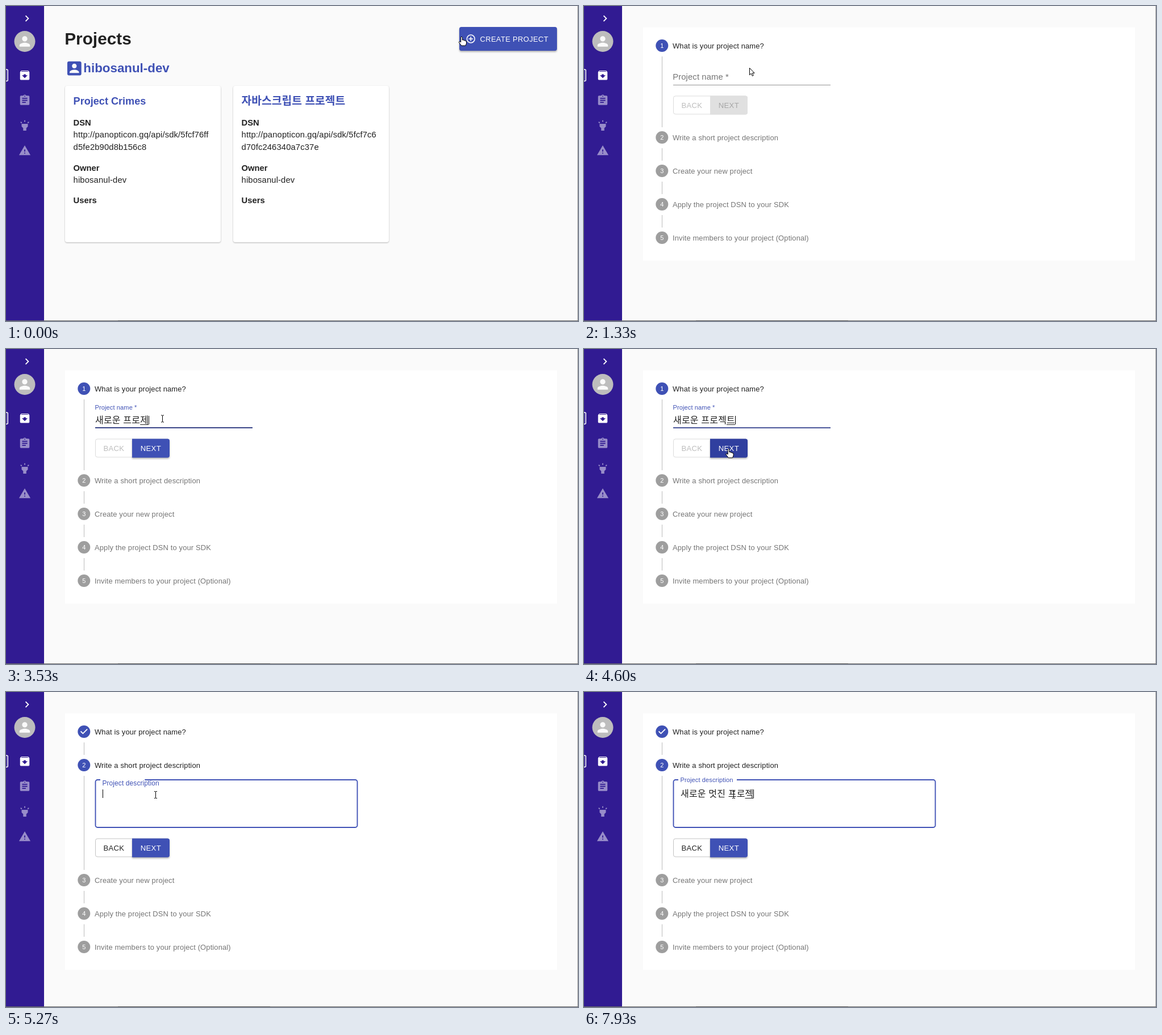
An HTML page for the animation above (8000 ms loop, 1007 by 556 pixels).

```html
<!DOCTYPE html>
<html lang="ko">
<head>
<meta charset="utf-8">
<title>Create project</title>
<style>
html, body { margin: 0; width: 100%; height: 100%; overflow: hidden; background: #fafafa; }
svg { display: block; }
text { font-family: "Liberation Sans", Arial, "Noto Sans CJK KR", "Noto Sans CJK", sans-serif; white-space: pre; }
.card { fill: #fff; filter: drop-shadow(0 1px 1px rgba(0,0,0,.28)); }
.raised { filter: drop-shadow(0 2px 1.5px rgba(0,0,0,.3)); }
.body { font-size: 14.77px; letter-spacing: .1385px; }
.btn { font-size: 13.1px; letter-spacing: .3px; text-anchor: middle; }
.typed { font-size: 16px; letter-spacing: .18px; fill: #212121; }
.step { font-size: 12.93px; letter-spacing: .1385px; }
</style>
</head>
<body>
<svg id="stage" width="1007" height="556" viewBox="0 0 1007 556"></svg>
<script>
const BLUE = '#3f51b5', DARK_BLUE = '#303f9f', INK = '#212121', GREY = '#757575';
const LOOP = 8000, OPEN = 1000, NAME_FOCUS = 1800, NEXT_CLICK = 4784, DESC_FOCUS = 5190;

const icons = {
  chevron: 'M10 6 8.59 7.41 13.17 12l-4.58 4.59L10 18l6-6z',
  person: 'M12 12c2.21 0 4-1.79 4-4s-1.79-4-4-4-4 1.79-4 4 1.79 4 4 4zm0 2c-2.67 0-8 1.34-8 4v2h16v-2c0-2.66-5.33-4-8-4z',
  archive: 'M20.54 5.23l-1.39-1.68C18.88 3.21 18.47 3 18 3H6c-.47 0-.88.21-1.16.55L3.46 5.23C3.17 5.57 3 6.02 3 6.5V19c0 1.1.9 2 2 2h14c1.1 0 2-.9 2-2V6.5c0-.48-.17-.93-.46-1.27zM12 17.5 6.5 12H10v-2h4v2h3.5zM5.12 5l.81-1h12l.94 1z',
  tasks: 'M19 3h-4.18C14.4 1.84 13.3 1 12 1s-2.4.84-2.82 2H5c-1.1 0-2 .9-2 2v14c0 1.1.9 2 2 2h14c1.1 0 2-.9 2-2V5c0-1.1-.9-2-2-2zm-7 0c.55 0 1 .45 1 1s-.45 1-1 1-1-.45-1-1 .45-1 1-1zm2 14H7v-2h7zm3-4H7v-2h10zm0-4H7V7h10z',
  torch: 'M6 14l3 3v5h6v-5l3-3V9H6zM11 2h2v3h-2zM3.5 5.9 4.9 4.5 7 6.6 5.6 8zM17 6.6l2.1-2.1 1.4 1.4L18.4 8z',
  warning: 'M1 21h22L12 2zm12-3h-2v-2h2zm0-4h-2v-4h2z',
  account: 'M3 5v14c0 1.1.89 2 2 2h14c1.1 0 2-.9 2-2V5c0-1.1-.9-2-2-2H5c-1.11 0-2 .9-2 2zm12 4c0 1.66-1.34 3-3 3s-3-1.34-3-3 1.34-3 3-3 3 1.34 3 3zm-9 8c0-2 4-3.1 6-3.1s6 1.1 6 3.1v1H6z',
  check: 'M10 17 5 12l1.41-1.41L10 14.17l7.59-7.59L19 8z',
  plus: 'M13 7h-2v4H7v2h4v4h2v-4h4v-2h-4zM12 2a10 10 0 1 0 0 20 10 10 0 1 0 0-20zm0 18a8 8 0 1 1 0-16 8 8 0 1 1 0 16z'
};

const icon = (name, x, y, size, fill = '#fff', extra = '') =>
  `<path d="${icons[name]}" fill="${fill}" fill-rule="evenodd" ${extra} transform="translate(${x - size / 2} ${y - size / 2}) scale(${size / 24})"/>`;
const text = (x, y, str, attrs = '') => `<text x="${x}" y="${y}" ${attrs}>${str}</text>`;
const rect = (x, y, w, h, attrs = '') => `<rect x="${x}" y="${y}" width="${w}" height="${h}" ${attrs}/>`;
const bold = (x, y, str, size, fill = INK) => text(x, y, str, `font-size="${size}" font-weight="700" fill="${fill}"`);

function projectCard(x, title, titleSize, url) {
  const tx = x + 14.6, body = `class="body" fill="${INK}"`;
  return rect(x, 141, 274, 276, 'rx="3.7" class="card"') +
    bold(tx, 174, title, titleSize, BLUE) +
    bold(tx, 210.5, 'DSN', 14.77) +
    url.map((line, i) => text(tx, 232 + 22 * i, line, body)).join('') +
    bold(tx, 290.5, 'Owner', 14.77) + text(tx, 312, 'hibosanul-dev', body) +
    bold(tx, 348, 'Users', 14.77);
}

// Back / next pair; y is the top edge
const buttons = (id, y, backOn) =>
  rect(157.5, y + .5, 130, 32, `rx="3.5" fill="#fff" stroke="rgba(0,0,0,${backOn ? .23 : .14})"`) +
  `<path id="${id}" d="M222 ${y}h62.3a3.7 3.7 0 0 1 3.7 3.7v26a3.7 3.7 0 0 1-3.7 3.7H222z" fill="${BLUE}" class="raised"/>` +
  text(189.9, y + 21.2, 'BACK', `class="btn" fill="${backOn ? INK : '#bdbdbd'}"`) +
  text(254.9, y + 21.2, 'NEXT', `id="${id}Text" class="btn" fill="#fff"`);

const field = (id, x, y) =>
  text(x, y, '', `id="${id}" class="typed"`) +
  rect(x, y + 2, 0, 1, `id="${id}Mark" fill="${INK}"`) +
  rect(x, y - 13, 1, 15, `id="${id}Caret" fill="#000"`);

const nameForm =
  text(0, 0, 'Project name *', 'id="nameLabel" class="body"') + field('name', 157, 61) +
  rect(157, 69, 277, 1, 'id="nameLine" fill="#949494"') +
  rect(157, 68.2, 277, 1.8, `id="nameFocus" fill="#37458f"`) +
  buttons('next1', 88.4, false);
const descForm =
  rect(157.5, 26, 461, 84, 'id="box" rx="3.7" fill="none"') +
  rect(166, 24, 103, 4, 'id="notch" fill="#fff"') +
  text(0, 0, 'Project description', 'id="descLabel" class="body"') + field('desc', 170, 56) +
  buttons('next2', 129.4, true);

const labels = ['What is your project name?', 'Write a short project description', 'Create your new project',
  'Apply the project DSN to your SDK', 'Invite members to your project (Optional)'];
const forms = [nameForm, descForm, '', '', ''];

const stepper = labels.map((label, i) => `<g id="step${i}">
  <circle id="dot${i}" cx="137.3" r="11"/>
  ${text(137.3, 4, i + 1, `id="num${i}" font-size="11" fill="#fff" text-anchor="middle"`)}
  ${i ? '' : icon('check', 137.3, 0, 22, '#fff', 'id="tick"')}
  ${text(156, 4.5, label, `id="label${i}" class="step"`)}
  ${i < 4 ? rect(137, 19, 1, 22, `id="rail${i}" fill="#bdbdbd"`) : ''}
  <svg id="form${i}" y="19" width="1007" height="0"><g transform="translate(0 -19)">${forms[i]}</g></svg>
</g>`).join('');

const $ = id => document.getElementById(id);
$('stage').innerHTML =
  rect(0, 0, 1007, 556, 'fill="#fafafa"') +
  rect(0, 0, 67, 556, 'fill="#311b92"') +
  icon('chevron', 37, 22, 22) +
  '<circle cx="33" cy="62.5" r="18.5" fill="#bdbdbd"/>' + icon('person', 33, 62.5, 27.7, '#fafafa') +
  rect(-4, 112, 7.3, 20.5, 'rx="2" fill="#4a3a9e" stroke="#fff" stroke-width="1.4"') +
  icon('archive', 33, 122.3, 22) +
  ['tasks', 'torch', 'warning'].map((n, i) => icon(n, 33, 166.5 + 44.3 * i, 22, '#988dc9')).join('') +
  `<g id="list">${bold(103.2, 68, 'Projects', 29.8)}
    ${icon('account', 120.3, 110, 33, BLUE)}${bold(136.3, 117, 'hibosanul-dev', 22.35, BLUE)}
    ${rect(798, 37, 172, 42, 'id="create" rx="3.7" class="raised"')}
    ${icon('plus', 818.3, 58, 18.5)}
    ${text(834.5, 62.7, 'CREATE PROJECT', 'font-size="12.92" letter-spacing=".37" fill="#fff"')}
    ${projectCard(104, 'Project Crimes', 18.1, ['http://panopticon.gq/api/sdk/5fcf76ff', 'd5fe2b90d8b156c8'])}
    ${projectCard(400, '자바스크립트 프로젝트', 19.3, ['http://panopticon.gq/api/sdk/5fcf7c6', 'd70fc246340a7c37e'])}
  </g>
  <g id="wizard">${rect(104, 37.5, 866, 412, 'id="paper" fill="#fff"')}${stepper}</g>` +
  rect(1006, 0, 1, 556, 'fill="#a0a0a0"') + rect(0, 555, 1007, 1, 'fill="#666"') + rect(197, 555, 268, 1, 'fill="#444"') +
  `<g id="pointer" stroke="#000" stroke-width="1" stroke-linejoin="round" fill="#fff">
    <path id="hand" d="M-1.3 1.2Q0-1 1.3 1.2V6L3.8 5.8 4.4 7 6.6 6.8 7.2 8 8.6 8.3V12L7 16H-.2L-4.6 10.2Q-4.4 8-2.6 9L-1.3 10z"/>
    <path id="arrow" d="M0 0V12.2L2.8 9.6 4.8 14 6.8 13.1 4.9 8.8H8.6z"/>
    <path id="beam" fill="none" d="M-2.5-6H-.6L0-5.4.6-6H2.5M0-5.4V5.4M-2.5 6H-.6L0 5.4.6 6H2.5"/>
  </g>`;

const phrase = (prefix, states) => states.split('|').map(s => prefix + s);
const opening = phrase('', 'ㅅ|새|샐|새로|새롱|새로우|새로운|새로운 ');
const project = 'ㅍ|프|플|프로|프롲|프로제|프로젝|프로젝ㅌ|프로젝트';
const nameKeys = [...opening, ...phrase('새로운 ', project)];
const descKeys = [...opening, ...phrase('새로운 ', 'ㅁ|머|멋|멋ㅈ|멋지|멋진|멋진 '), ...phrase('새로운 멋진 ', project)];

// time, x, y of the hot spot
const route = [[0, 802, 54], [150, 802, 54], [600, 842, 58], [OPEN, 842, 58], [1320, 291.5, 109.5], [1420, 291.5, 109.5],
  [1650, 275.5, 123], [3900, 275.5, 123], [4400, 254.5, 176], [4780, 254.5, 176], [4920, 254.5, 183],
  [5030, 254.5, 183], [DESC_FOCUS, 263.5, 181.5], [LOOP, 263.5, 181.5]];

const clamp = v => Math.min(1, Math.max(0, v));
const mix = (a, b, k) => a + (b - a) * k;
function bezier(x1, y1, x2, y2) {
  const curve = (a, b, u) => 3 * (1 - u) ** 2 * u * a + 3 * (1 - u) * u * u * b + u ** 3;
  return x => {
    if (x <= 0 || x >= 1) return clamp(x);
    let lo = 0, hi = 1;
    for (let i = 0; i < 20; i++) {
      const mid = (lo + hi) / 2;
      if (curve(x1, x2, mid) < x) lo = mid; else hi = mid;
    }
    return curve(y1, y2, lo);
  };
}
const standard = bezier(.4, 0, .2, 1), easeOut = bezier(0, 0, .2, 1);
const span = (t, start, length, ease) => ease(clamp((t - start) / length));

function set(id, attrs) {
  for (const key in attrs) $(id).setAttribute(key, attrs[key]);
}
const show = (id, on) => set(id, { visibility: on ? 'inherit' : 'hidden' });

function type(id, str, focused) {
  const el = $(id), x = +el.getAttribute('x');
  if (el.textContent !== str) el.textContent = str;
  const end = str ? el.getComputedTextLength() : 0;
  const composing = focused && str && !str.endsWith(' ');
  const start = composing && str.length > 1 ? el.getSubStringLength(0, str.length - 1) : 0;
  set(id + 'Mark', { x: x + start, width: composing ? end - start : 0 });
  set(id + 'Caret', { x: Math.round(x + end) });
  show(id + 'Caret', focused);
}
const typedAt = (keys, t, start, pace) => keys[Math.min(keys.length - 1, Math.floor((t - start) / pace))] || '';

function placeLabel(id, k, from, to, fill) {
  const [x, y] = from.map((v, i) => mix(v, to[i], k));
  set(id, { transform: `translate(${x} ${y}) scale(${mix(1, .75, k)})`, fill });
}

function drawPointer(t) {
  const i = route.findIndex(p => p[0] > t), a = route[i - 1], b = route[i];
  const k = span(t, a[0], b[0] - a[0], bezier(.3, 0, .5, 1));
  set('pointer', { transform: `translate(${mix(a[1], b[1], k)} ${mix(a[2], b[2], k)})` });
  const shape = t < OPEN ? 'hand' : t < 1550 ? 'arrow' : t < 4150 ? 'beam' : t < 4260 ? 'arrow' : t < 4800 ? 'hand' : 'beam';
  for (const s of ['hand', 'arrow', 'beam']) show(s, s === shape);
}

function drawSteps(t) {
  const done = t >= NEXT_CLICK;
  const heights = [103 * (1 - span(t, NEXT_CLICK, 241, standard)), 144 * span(t, NEXT_CLICK, 260, standard), 0, 0, 0];
  let y = 70;
  heights.forEach((h, i) => {
    const active = i === 0 || (i === 1 && done);
    const open = h === [103, 144][i];
    set('step' + i, { transform: `translate(0 ${y})` });
    set('dot' + i, { fill: active ? BLUE : '#9e9e9e' });
    set('label' + i, { fill: active ? INK : GREY });
    set('form' + i, { height: h + (open ? 4 : 0) });
    if (i < 4) set('rail' + i, { height: 22 + h });
    y += 59 + h;
  });
  set('paper', { height: y - 59 + 40.5 - 37.5 });
  show('num0', !done);
  show('tick', done);
}

function drawNameForm(t) {
  const focused = t >= NAME_FOCUS && t < NEXT_CLICK - 80;
  const str = typedAt(nameKeys, t, 2270, 93);
  const hover = t > 1560 && t < 4100;
  type('name', str, focused);
  placeLabel('nameLabel', span(t, NAME_FOCUS, 200, easeOut), [156.2, 60.3], [156.5, 37], focused ? BLUE : GREY);
  set('nameLine', hover ? { y: 68.2, height: 1.8, fill: INK } : { y: 69, height: 1, fill: '#949494' });
  const grow = focused ? span(t, NAME_FOCUS, 200, easeOut) : 1 - span(t, NEXT_CLICK - 80, 200, easeOut);
  const w = t < NAME_FOCUS ? 0 : 277 * grow;
  set('nameFocus', { x: 295.5 - w / 2, width: w });
  set('next1', { fill: str ? t > 4260 ? DARK_BLUE : BLUE : '#e0e0e0', class: str ? 'raised' : '' });
  set('next1Text', { fill: str ? '#fff' : '#a6a6a6' });
}

function drawDescForm(t) {
  const focused = t >= DESC_FOCUS, k = span(t, DESC_FOCUS, 200, easeOut);
  type('desc', typedAt(descKeys, t, 5860, 98), focused);
  placeLabel('descLabel', k, [169, 56.3], [169.5, 30], focused ? BLUE : '#808080');
  set('box', { stroke: focused ? BLUE : INK, 'stroke-width': focused ? 1.85 : 1 });
  set('notch', { width: 103 * k });
}

function mixColor(k) {
  const a = [63, 81, 181], b = [48, 63, 159];
  return `rgb(${a.map((v, i) => Math.round(mix(v, b[i], k)))})`;
}

function draw(now) {
  const t = now % LOOP;
  show('list', t < OPEN);
  show('wizard', t >= OPEN);
  set('create', { fill: mixColor(span(t, 70, 250, standard)) });
  drawSteps(t);
  drawNameForm(t);
  drawDescForm(t);
  drawPointer(t);
}

const begin = performance.now();
(function tick() {
  draw(performance.now() - begin);
  requestAnimationFrame(tick);
})();
</script>
</body>
</html>
```
